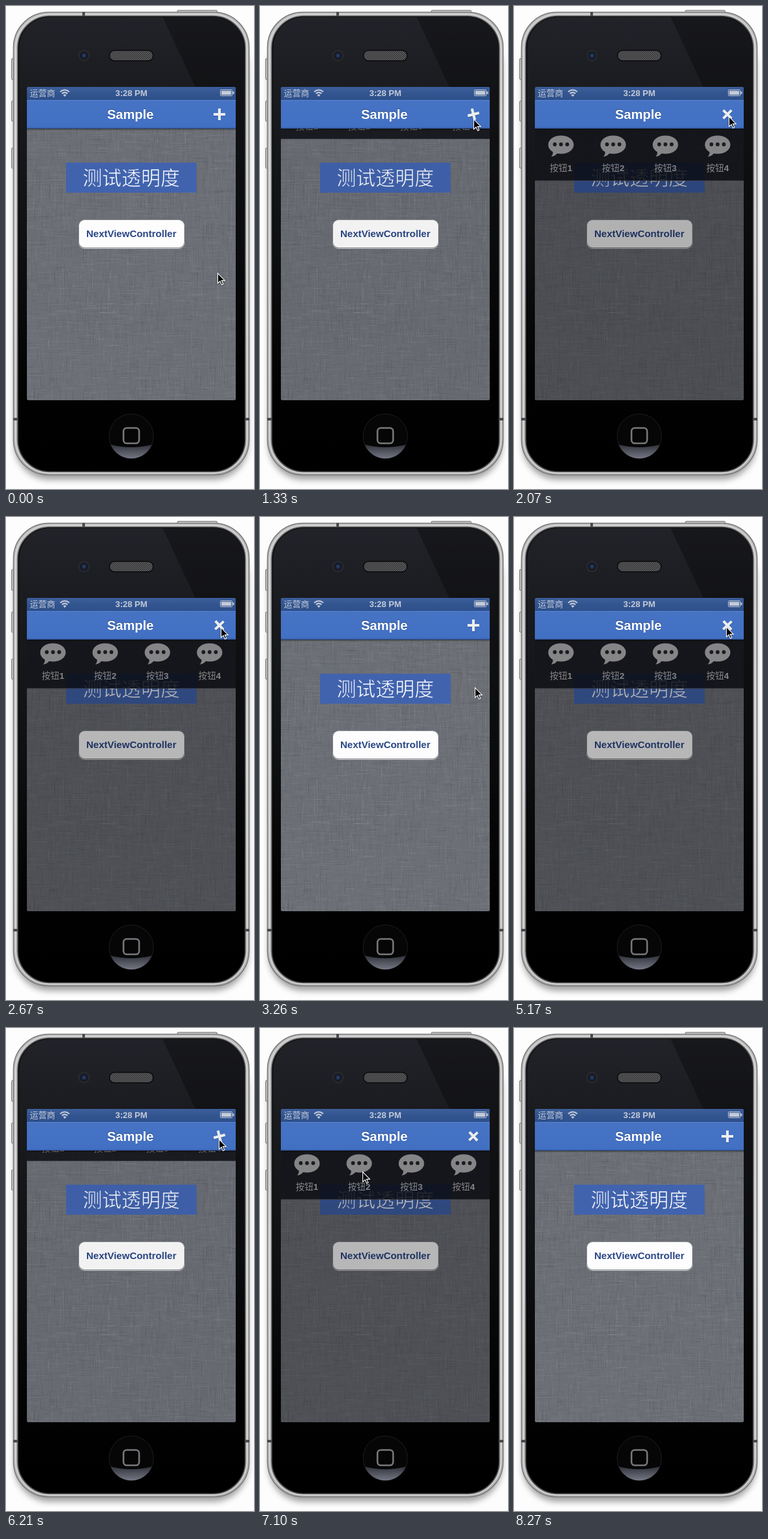
These frames come from a looping animation (380 px wide and 740 px high, 8620 ms). An HTML page with a canvas:

```html
<!DOCTYPE html>
<html lang="zh">
<head>
<meta charset="utf-8">
<title>Drop-down menu</title>
<style>
  html, body { margin: 0; width: 100%; height: 100%; overflow: hidden; background: #fdfdfd; }
  svg.layer, canvas { position: absolute; left: 0; top: 0; }
  #linen { left: 32px; top: 188px; }
  text { font-family: "Liberation Sans", Arial, sans-serif; text-anchor: middle; }
  .cjk { font-family: "Noto Sans CJK SC", "Noto Sans CJK", sans-serif; }
  .bold { font-weight: 700; }
</style>
</head>
<body>
<svg class="layer" width="380" height="740">
  <defs>
    <linearGradient id="face" x1="0" y1="0" x2="0" y2="1">
      <stop offset="0" stop-color="#222329"/>
      <stop offset=".15" stop-color="#1b1c20"/>
      <stop offset=".5" stop-color="#0f1012"/>
      <stop offset=".82" stop-color="#020202"/>
      <stop offset="1" stop-color="#000"/>
    </linearGradient>
    <linearGradient id="metal" x1="0" y1="0" x2="0" y2="1">
      <stop offset="0" stop-color="#bdbdbd"/>
      <stop offset=".5" stop-color="#cbcbcb"/>
      <stop offset="1" stop-color="#b4b4b4"/>
    </linearGradient>
    <linearGradient id="crescent" x1="0" y1="0" x2="0" y2="1">
      <stop offset="0" stop-color="#30323a"/>
      <stop offset="1" stop-color="#747784"/>
    </linearGradient>
    <radialGradient id="lens">
      <stop offset="0" stop-color="#2c4a80"/>
      <stop offset=".35" stop-color="#1a2744"/>
      <stop offset=".6" stop-color="#14161c"/>
      <stop offset="1" stop-color="#303238"/>
    </radialGradient>
    <pattern id="mesh" width="3" height="3" patternUnits="userSpaceOnUse">
      <rect width="3" height="3" fill="#6a6a6d"/>
      <path d="M0 0h1.5v1.5h-1.5zM1.5 1.5h1.5v1.5h-1.5z" fill="#29292b"/>
    </pattern>
    <filter id="blur" x="-20%" y="-20%" width="140%" height="140%"><feGaussianBlur stdDeviation="5"/></filter>
    <clipPath id="faceClip"><rect x="20" y="17" width="345" height="695" rx="47"/></clipPath>
  </defs>

  <rect x="13" y="40" width="358" height="686" rx="54" fill="#666" opacity=".6" filter="url(#blur)"/>
  <g fill="#c6c6c6" stroke="#7d7d7d">
    <rect x="8.5" y="80.5" width="6" height="32" rx="1.5"/>
    <rect x="8.5" y="145.5" width="6" height="31" rx="1.5"/>
    <rect x="8.5" y="217.5" width="6" height="31" rx="1.5"/>
    <rect x="262.5" y="6.5" width="61" height="7" rx="1.5"/>
  </g>
  <rect x="11.5" y="9.5" width="361" height="709" rx="54" fill="url(#metal)" stroke="#7b7b7b" stroke-width="1.6"/>
  <rect x="14.5" y="12.5" width="355" height="703" rx="52" fill="none" stroke="#e6e6e6"/>
  <g fill="#4a4a4c">
    <rect x="117" y="9" width="4" height="7"/>
    <rect x="11" y="631" width="8" height="4"/>
    <rect x="365" y="631" width="8" height="4"/>
  </g>
  <rect x="18" y="15.5" width="348.500" height="698" rx="49" fill="#000" stroke="#4c4c4e" stroke-width="1.6"/>
  <g clip-path="url(#faceClip)">
    <rect x="20" y="17" width="345" height="695" fill="url(#face)"/>
    <path d="M240 17L290 124H352V604H365V17Z" fill="#000" opacity=".32"/>
  </g>

  <circle cx="119.500" cy="76" r="8.5" fill="url(#lens)"/>
  <rect x="158.5" y="68" width="67" height="16" rx="8" fill="url(#mesh)" stroke="#0a0a0b" stroke-width="1.5"/>

  <circle cx="192" cy="659" r="34" fill="#060607" stroke="#1d1d20"/>
  <path d="M160.5 672Q192 680 223.5 672A34 34 0 0 1 160.5 672Z" fill="url(#crescent)"/>
  <rect x="180" y="646.5" width="24" height="23.5" rx="5" fill="none" stroke="#77787c" stroke-width="2.6"/>

  <rect x="32" y="124" width="320" height="480" rx="3" fill="#6c6f76"/>
</svg>

<canvas id="linen" width="320" height="416"></canvas>

<svg class="layer" width="380" height="740">
  <defs>
    <linearGradient id="status" x1="0" y1="0" x2="0" y2="1">
      <stop offset="0" stop-color="#3c5f9d"/>
      <stop offset=".5" stop-color="#33558f"/>
      <stop offset="1" stop-color="#2d4f8b"/>
    </linearGradient>
    <linearGradient id="nav" x1="0" y1="0" x2="0" y2="1">
      <stop offset="0" stop-color="#4673c4"/>
      <stop offset=".92" stop-color="#4270c3"/>
      <stop offset="1" stop-color="#3a62ac"/>
    </linearGradient>
    <linearGradient id="edge" x1="0" y1="0" x2="0" y2="1">
      <stop offset="0" stop-color="#000" stop-opacity=".4"/>
      <stop offset="1" stop-color="#000" stop-opacity="0"/>
    </linearGradient>
    <g id="bubble">
      <path d="M0 -15.5C11 -15.5 19.5 -9.5 19.5 -1.5S11 12.5 0 12.5C-2 12.5 -4 12.3 -6 12C-8 14.5 -11 16.5 -15 16.8C-13 14.5 -12 12 -12.5 9.5C-17 7 -19.5 3 -19.5 -1.5C-19.5 -9.5 -11 -15.5 0 -15.5Z" fill="#858587"/>
      <g fill="#1b1c20">
        <circle cx="-9.5" cy="-2" r="2.9"/><circle cy="-2" r="2.9"/><circle cx="9.5" cy="-2" r="2.9"/>
      </g>
    </g>
    <clipPath id="bottomCorners"><rect x="0" y="-20" width="320" height="436" rx="3"/></clipPath>
  </defs>

  <rect x="92" y="240" width="200" height="46" fill="#4163ae"/>
  <text class="cjk" x="192" y="274" font-size="29.8" font-weight="300" fill="#fff" stroke="#4163ae" stroke-width=".6">测试透明度</text>
  <rect x="111.5" y="328.5" width="162" height="43" rx="9" fill="none" stroke="#d5d6d8"/>
  <rect x="111.5" y="327.5" width="162" height="43" rx="9" fill="#fdfdfe" stroke="#86888d"/>
  <text class="bold" x="192" y="354" font-size="15" fill="#2a4685">NextViewController</text>

  <svg x="32" y="188" width="320" height="416" overflow="hidden">
    <rect id="dim" width="320" height="416" clip-path="url(#bottomCorners)"/>
    <g id="menu">
      <rect width="320" height="80" fill="#090a0f" fill-opacity=".82"/>
      <rect y="79" width="320" height="1" fill="#34353a"/>
    </g>
    <rect width="320" height="3" fill="url(#edge)"/>
  </svg>

  <path d="M32 144V127a3 3 0 0 1 3-3H349a3 3 0 0 1 3 3V144Z" fill="url(#status)"/>
  <rect x="32" y="144" width="320" height="44" fill="url(#nav)"/>
  <rect x="32" y="144" width="320" height="1" fill="#5a84cd"/>
  <rect x="32" y="187" width="320" height="1" fill="#2b4a85"/>

  <g fill="#c3cad8">
    <text class="cjk" x="56" y="138" font-size="13">运营商</text>
    <text class="bold" x="192" y="138" font-size="13">3:28 PM</text>
    <path d="M83 131.5Q90 125.5 97 131.5M85.7 134.3Q90 130.5 94.3 134.3" fill="none" stroke="#c3cad8" stroke-width="2"/>
    <path d="M87.5 136.3Q90 134.2 92.5 136.3L90 139Z"/>
    <rect x="328.5" y="128.5" width="18" height="9" rx="1" fill="none" stroke="#c3cad8"/>
    <rect x="330" y="130" width="15" height="6"/>
    <rect x="347.5" y="131" width="2" height="4"/>
  </g>

  <text class="bold" x="190.5" y="172" font-size="20" fill="#1f3c72" opacity=".8">Sample</text>
  <text class="bold" x="190.5" y="173" font-size="20" fill="#fff">Sample</text>

  <g id="plus">
    <path d="M-9 1H9M0 -8V10" stroke="#24427c" stroke-opacity=".5" stroke-width="4"/>
    <path d="M-9 0H9M0 -9V9" stroke="#eceded" stroke-width="4"/>
  </g>

  <path id="cursor" d="M.5 .5V15.8L4 12.5L6.5 18L8.8 17L6.4 11.6H11.3Z"
    fill="#000" stroke="#fff" stroke-width="1.1" style="filter:drop-shadow(0 1px 1px rgba(0,0,0,.35))"/>
</svg>

<script>
const LOOP = 8620, STEP = 145;
const $ = id => document.getElementById(id);

// Toggles of the menu: start time and openness at each step.
const OPENING = [.2, .96, 1], CLOSING = [.94, .3, 0];
const toggles = [
  [1330, OPENING], [2670, CLOSING], [4150, OPENING],
  [5030, CLOSING], [6210, OPENING], [7100, CLOSING]
];

// Pointer runs: start time, then one position per step.
const runs = [
  [0, [[324, 409]]],
  [450, [[323, 392], [322, 335], [323, 255], [325, 195], [327, 173]]],
  [1920, [[328, 171], [329, 169]]],
  [2970, [[331, 200], [330, 246], [329, 261], [328, 245], [326, 200], [325, 166], [323, 149]]],
  [4150, [[324, 162]]],
  [4590, [[325, 175], [327, 180], [326, 171], [325, 168]]],
  [5610, [[327, 184], [329, 208], [328, 200], [326, 178], [326, 170], [326, 170],
    [310, 176], [260, 193], [200, 213], [162, 221], [157, 220]]],
  [7680, [[150, 262], [128, 380], [98, 540], [62, 712], [60, 760]]]
];

function valueAt(table, t, initial) {
  let value = initial;
  for (const [start, list] of table) {
    if (t < start) break;
    value = list[Math.min(list.length - 1, Math.floor((t - start) / STEP))];
  }
  return value;
}

function weaveLinen() {
  const ctx = $('linen').getContext('2d');
  let seed = 20;
  const rnd = () => (seed = (seed * 16807) % 2147483647) / 2147483647;
  ctx.beginPath();
  ctx.roundRect(0, -10, 320, 426, 3);
  ctx.clip();
  ctx.fillStyle = '#6c6f76';
  ctx.fillRect(0, 0, 320, 416);
  for (let i = 0; i < 6000; i++) {
    const len = 4 + rnd() * 26, across = rnd() < .5;
    const x = Math.floor(rnd() * 350) - 30, y = Math.floor(rnd() * 446) - 30;
    const shade = rnd() < .45 ? '255,255,255' : '0,0,0';
    ctx.fillStyle = `rgba(${shade},${.015 + rnd() * .04})`;
    ctx.fillRect(x, y, across ? len : 1, across ? 1 : len);
  }
}

function addButtons() {
  let html = '';
  for (let i = 0; i < 4; i++) {
    const x = 40 + i * 80;
    html += `<use href="#bubble" x="${x}" y="26"/>
      <text class="cjk" x="${x}" y="65" font-size="13.5" fill="#858587">按钮<tspan
      class="bold" font-family="Liberation Sans, sans-serif">${i + 1}</tspan></text>`;
  }
  $('menu').insertAdjacentHTML('beforeend', html);
}

function draw() {
  const t = performance.now() % LOOP;
  const open = valueAt(toggles, t, 0);
  const [x, y] = valueAt(runs, t);
  $('dim').setAttribute('opacity', .3 * open ** 1.2);
  $('menu').setAttribute('transform', `translate(0 ${Math.round(80 * (open - 1))})`);
  $('menu').setAttribute('visibility', open ? 'visible' : 'hidden');
  $('plus').setAttribute('transform', `translate(327 166) rotate(${-45 * open ** .7})`);
  $('cursor').setAttribute('transform', `translate(${x} ${y})`);
  requestAnimationFrame(draw);
}

weaveLinen();
addButtons();
draw();
</script>
</body>
</html>
```
